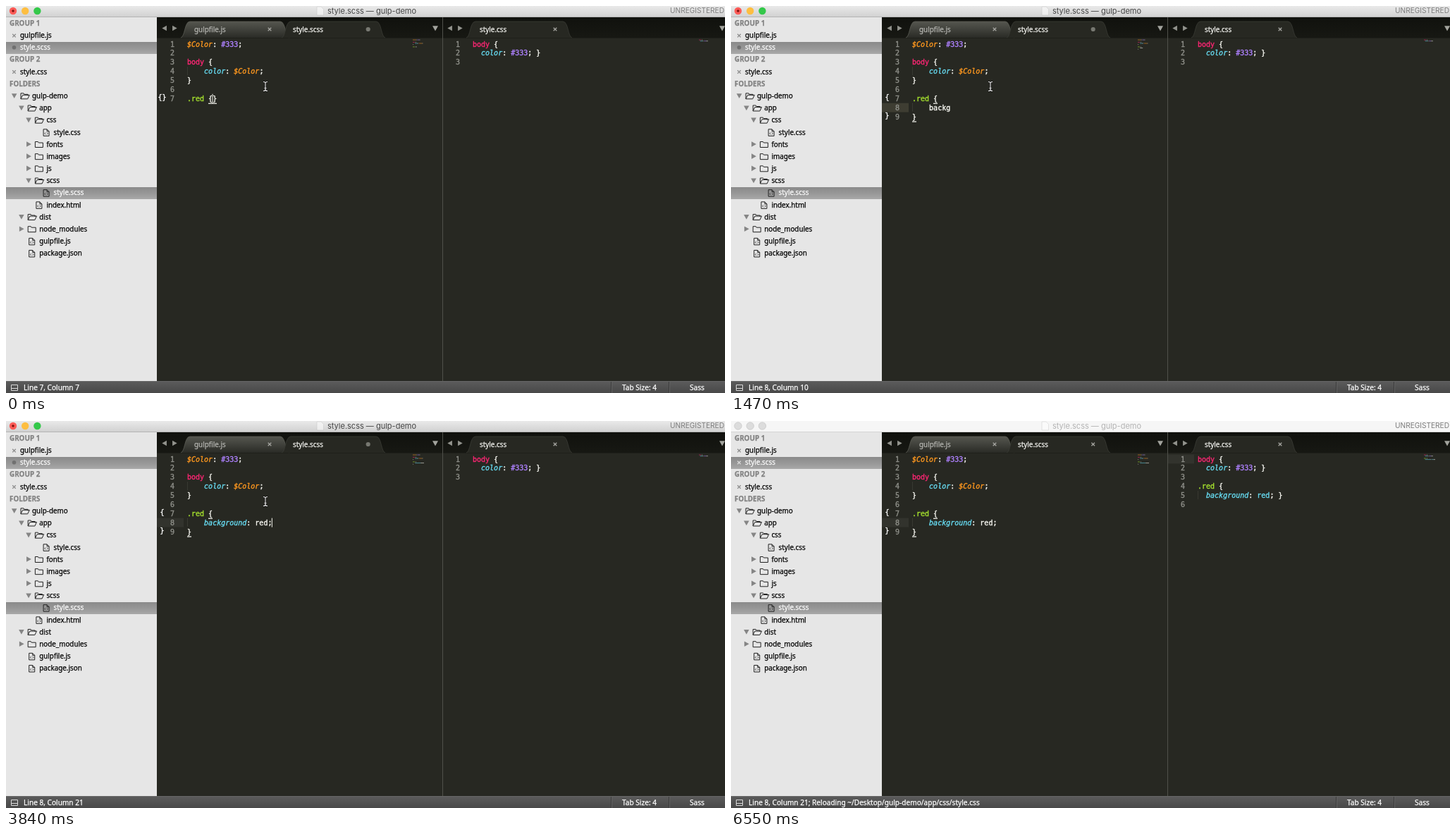
These frames come from a looping animation (1020 by 549 pixels, 6650 ms). An HTML page:

```html
<!DOCTYPE html>
<html lang="en">
<head>
<meta charset="utf-8">
<title>Sass editing demo</title>
<style>
html, body { margin: 0; width: 100%; height: 100%; overflow: hidden; background: #272822; }
svg { display: block; width: 1020px; height: 549px; }
text { white-space: pre; font: 9.85px "Noto Sans", "Open Sans", sans-serif; stroke-width: .25px; }
.mono { font: 10px "DejaVu Sans Mono", monospace; stroke-width: .38px; }
.list { stroke-width: .1px; }
.foot { font-size: 10.1px; }
.title { font: 11px Inter, Roboto, sans-serif; stroke-width: 0; }
.small { font-size: 10.15px; }
.i { font-style: italic; }
.b { font-weight: bold; }
.end { text-anchor: end; }
.mid { text-anchor: middle; }
</style>
</head>
<body>
<svg viewBox="0 0 1020 549">
  <defs>
    <linearGradient id="bar" x2="0" y2="1"><stop stop-color="#e9e9e9"/><stop offset="1" stop-color="#d2d2d2"/></linearGradient>
    <linearGradient id="row" x2="0" y2="1"><stop stop-color="#8a8a8a"/><stop offset=".5" stop-color="#979797"/><stop offset="1" stop-color="#a8a8a8"/></linearGradient>
    <linearGradient id="tabs" x2="0" y2="1"><stop stop-color="#10110d"/><stop offset="1" stop-color="#171813"/></linearGradient>
    <linearGradient id="back" x2="0" y2="1"><stop stop-color="#55564f"/><stop offset=".5" stop-color="#40413b"/><stop offset="1" stop-color="#2a2b26"/></linearGradient>
    <linearGradient id="foot" x2="0" y2="1"><stop stop-color="#5c5c5c"/><stop offset="1" stop-color="#484848"/></linearGradient>
    <linearGradient id="pick" x2="0" y2="1"><stop stop-color="#b4caec"/><stop offset="1" stop-color="#86a8d9"/></linearGradient>
    <filter id="shade" x="-10%" y="-10%" width="120%" height="130%"><feDropShadow dx="0" dy="2" stdDeviation="2" flood-opacity=".5"/></filter>
  </defs>
  <g id="base"></g>
  <g id="live"></g>
</svg>
<script>
const LOOP = 6650;
const CH = 6.02;
const PITCH = 12.88;
const INK = { w: '#f8f8f2', o: '#fd971f', p: '#ae81ff', r: '#f92672', c: '#66d9ef', k: '#66d9ef', g: '#a6e22e' };
const ITALIC = 'oc';

// Each entry changes part of the state from its time on.
const STEPS = [
  [0, { typed: null, caret: 1, dirty: true, split: false, built: false, active: true, note: '', mouse: [368, 114] }],
  [140, { typed: '' }],
  [290, { typed: 'b' }],
  [440, { typed: 'ba' }],
  [580, { typed: 'bac' }],
  [730, { typed: 'back' }],
  [880, { typed: 'backg' }],
  [1170, { split: true, caret: .7 }],
  [1320, { caret: .3 }],
  [1470, { caret: 0 }],
  [1770, { typed: 'backgr', caret: 1 }],
  [1920, { typed: 'backgro' }],
  [2060, { typed: 'backgrou' }],
  [2210, { typed: 'backgroun' }],
  [2510, { typed: 'background:' }],
  [2810, { typed: 'background: ' }],
  [2960, { typed: 'background: r' }],
  [3100, { typed: 'background: re' }],
  [3250, { typed: 'background: red' }],
  [3540, { typed: 'background: red;' }],
  [4130, { caret: .5 }],
  [4280, { caret: 0 }],
  [4430, { dirty: false, note: '; Saved ~/Desktop/gulp-demo/app/scss/style.scss (UTF-8)' }],
  [4870, { built: true, note: '; Reloading ~/Desktop/gulp-demo/app/css/style.css' }],
  [5020, { mouse: [355, 95] }],
  [5170, { mouse: [342, 75] }],
  [5320, { mouse: [430, 160] }],
  [5460, { mouse: [560, 272] }],
  [5610, { mouse: [685, 378] }],
  [5760, { mouse: [859, 478] }],
  [5910, { mouse: null }],
  [6200, { active: false }]
];

const SHORTCUTS = [
  ['b:a', 'bottom:auto'], ['bgz:a', 'background-size:auto'], ['bdlt:a', 'border-length:auto'],
  ['bga', 'background-attachment'], ['bga:s', 'background-attachment:scroll'], ['bga:f', 'background-attachment:fixed']
];
const VALUES = ['relative', 'repeat', 'red', 'repeat-x', 'repeat-y', 'col-resize', 'e-resize', 'n-resize'].map(v => [v]);

// Indent level, kind and label of the sidebar tree.
const TREE = [
  [0, 'open', 'gulp-demo'], [1, 'open', 'app'], [2, 'open', 'css'], [3, 'file', 'style.css'],
  [2, 'shut', 'fonts'], [2, 'shut', 'images'], [2, 'shut', 'js'], [2, 'open', 'scss'],
  [3, 'file', 'style.scss'], [2, 'file', 'index.html'], [1, 'open', 'dist'],
  [1, 'shut', 'node_modules'], [1, 'file', 'gulpfile.js'], [1, 'file', 'package.json']
];

const rect = (x, y, w, h, fill, more = '') => `<rect x="${x}" y="${y}" width="${w}" height="${h}" fill="${fill}" ${more}/>`;
const line = (d, color, more = '') => `<path d="${d}" fill="none" stroke="${color}" ${more}/>`;
const dot = (x, y, r, fill, more = '') => `<circle cx="${x}" cy="${y}" r="${r}" fill="${fill}" ${more}/>`;
const text = (x, y, s, fill, cls = '') => `<text x="${x}" y="${y}" fill="${fill}" stroke="${fill}" class="${cls}">${s}</text>`;
const mono = (x, y, s, fill, cls = '') => text(x, y, s, fill, 'mono ' + cls);
const cross = (x, y, color) => line(`M${x - 2.3} ${y - 2.3}l4.6 4.6m0 -4.6l-4.6 4.6`, color, 'stroke-width="1.3"');
const arrow = (x, y, turn, color, r = 3.8) =>
  `<path d="M${-r} ${-r * .8}H${r}L0 ${r}Z" fill="${color}" transform="translate(${x} ${y}) rotate(${turn})"/>`;
const rowY = i => 24.3 + 17.17 * i;
const lineY = n => 54 + PITCH * (n - 1);

function tab(l, r, fill, edge) {
  const top = `M${l} 45C${l + 6} 44 ${l + 5} 22 ${l + 13} 22H${r - 13}C${r - 5} 22 ${r - 6} 44 ${r} 45`;
  return `<path d="${top}Z" fill="${fill}"/>` + line(top, edge, 'stroke-width=".8"');
}

function folder(x, y, open) {
  const d = open
    ? `M${x + .5} ${y + 4}V${y - 4}h4l1 1.5h5v2M${x + .5} ${y + 4}l2.7 -5.5h9.6l-2.6 5.5Z`
    : `M${x + .5} ${y + 4}V${y - 4}h4l1 1.5h6v6.5Z`;
  return line(d, '#222', 'stroke-linejoin="round"');
}

function page(x, y) {
  return line(`M${x + .5} ${y - 4.5}h5l3 3v6.5h-8Z M${x + 5.5} ${y - 4.5}v3h3`, '#222') +
    line(`M${x + 3.6} ${y}l-1.4 1.5l1.4 1.5m1.8 -3l1.4 1.5l-1.4 1.5`, '#222', 'stroke-width=".8"');
}

function sidebar() {
  let s = rect(0, 15, 214, 517, '#e6e6e6') + rect(0, 51, 214, 17, 'url(#row)') + rect(0, 257, 214, 17, 'url(#row)');
  [[0, 'GROUP 1'], [3, 'GROUP 2'], [5, 'FOLDERS']].forEach(([i, name]) => {
    s += text(5, rowY(i) + 3.6, name, '#828282', 'b');
  });
  [[1, 'gulpfile.js', '#000'], [2, 'style.scss', '#fff'], [4, 'style.css', '#000']].forEach(([i, name, ink]) => {
    s += text(20, rowY(i) + 3.7, name, ink);
    if (i !== 2) s += cross(11.5, rowY(i) + .6, '#8c8c8c');
  });
  TREE.forEach(([level, kind, name], i) => {
    const y = rowY(i + 6), x = 37 + 10.2 * level;
    if (kind === 'file') s += page(x - 15, y + .5);
    else s += arrow(x - 25.3, y, kind === 'open' ? 0 : -90, '#858585') + folder(x - 16.5, y + .5, kind === 'open');
    s += text(x, y + 3.7, name, i === 8 ? '#fff' : '#000');
  });
  return s;
}

function frame() {
  let s = rect(214, 15, 806, 517, '#272822') + rect(214, 15, 806, 30.5, 'url(#tabs)');
  s += tab(248, 402, 'url(#back)', '#5b5c55') + tab(391, 538, '#272822', '#3c3d37') + tab(653, 803, '#272822', '#3c3d37');
  s += text(267, 36.5, 'gulpfile.js', '#b5b5b1') + text(407, 36.5, 'style.scss', '#f8f8f4') + text(672, 36.5, 'style.css', '#f8f8f4');
  s += cross(374, 33, '#a5a5a0') + cross(779, 33, '#a5a5a0');
  [225, 630].forEach(x => s += arrow(x, 31.5, 90, '#92938d', 3.7) + arrow(x + 14, 31.5, -90, '#92938d', 3.7));
  [609, 1016].forEach(x => s += arrow(x, 31.5, 0, '#a3a49e', 4));
  s += rect(619, 15, 1, 517, '#50514b');
  s += rect(0, 532, 1020, 17, 'url(#foot)') + rect(0, 532, 1020, 1, '#666');
  s += line('M7.5 537.5h9v8h-9Z M7.5 542.5h9', '#d8d8d8');
  [859, 941].forEach(x => s += rect(x - 1, 533, 1, 16, '#3b3b3b') + rect(x, 533, 1, 16, '#626262'));
  return s + text(874, 545, 'Tab Size: 4', '#fff', 'foot') + text(970, 545, 'Sass', '#fff', 'foot');
}

function titleBar({ active, dirty }) {
  let s = rect(0, 0, 1020, 15, active ? 'url(#bar)' : '#f6f6f6') + rect(0, 15, 1020, 1, active ? '#b4b4b4' : '#d5d5d5');
  ['#fc5b57', '#fdbe41', '#34c84a'].forEach((c, i) => {
    s += dot(10 + 17.2 * i, 7, 5.2, active ? c : '#dcdcdc', active ? '' : 'stroke="#cacaca" stroke-width=".8"');
  });
  if (active && dirty) s += dot(10, 7, 1.8, '#7d120f');
  s += `<path d="M441 1h6l3.5 3.5V13H441Z" fill="#fff" stroke="#bbb" stroke-width=".6" opacity="${active && !dirty ? 1 : .55}"/>`;
  s += text(519, 11, 'style.scss — gulp-demo', active ? '#444' : '#b3b3b3', 'title mid');
  return s + text(1019, 10.3, 'UNREGISTERED', '#7d7d7d', 'title small end');
}

// Lines hold tokens split by "|"; the first letter of a token is its colour.
function code(lines, x, mapX) {
  let s = '';
  lines.forEach((src, i) => {
    const y = lineY(i + 1);
    let col = 0, spans = '';
    s += mono(x - 18, y + 3.6, i + 1, '#8f908a', 'end');
    src.split('|').filter(Boolean).forEach(token => {
      const key = token[0], body = token.slice(1), c = INK[key];
      spans += `<tspan fill="${c}" stroke="${c}" class="${ITALIC.includes(key) ? 'i' : ''}">${body}</tspan>`;
      const pad = body.length - body.trimStart().length, n = body.trim().length;
      if (n) s += rect(mapX + .8 * (col + pad), 47.6 + 1.65 * i, .8 * n, .9, c, 'opacity=".6"');
      col += body.length;
    });
    s += mono(x, y + 3.6, spans, INK.w);
  });
  return s;
}

function popup(x, rows, query, bar) {
  const h = rows.length * 13.75 + 1;
  let s = rect(x, 152, 259, h, '#fff', 'stroke="#777" stroke-width=".8" filter="url(#shade)"') +
    rect(x + .5, 152.5, 258, 13, 'url(#pick)');
  rows.forEach(([name, hint], i) => {
    let at = 0;
    const y = 162.5 + 13.72 * i;
    const label = [...name].map(ch => ch === query[at] ? (at++, `<tspan class="b" fill="#000">${ch}</tspan>`) : ch).join('');
    s += mono(x + 4, y, label, '#333', 'list');
    if (hint) s += mono(x + 255, y, hint, '#333', 'list i end');
  });
  return bar ? s + rect(x + 250, 154, 6, 50, '#777', 'rx="3"') : s;
}

function editor({ typed, caret, split, built }) {
  const open = typed !== null;
  const rule = (typed || '').match(/^(background)(:.*)$/);
  const body = rule ? `c${rule[1]}|w${rule[2]}` : 'w' + typed;
  const left = ['o$Color|w: |p#333|w;', '', 'rbody|w {', 'w    |ccolor|w: |o$Color|w;', 'w}', '']
    .concat(open ? ['g.red|w {', 'w    |' + body, 'w}'] : ['g.red|w {}']);
  const right = ['rbody|w {', 'w  |ccolor|w: |p#333|w; }', ''].concat(built ? ['g.red|w {', 'w  |cbackground|w: |kred|w; }', ''] : []);
  let s = '';
  if (open) s += rect(214, 137.7, 38, 12.9, typed === 'backg' && split ? '#3e3d32' : '#32332d');
  if (built) s += rect(620, 47.5, 37, 12.9, '#32332d');
  const guide = (x, n) => line(`M${x} ${lineY(n) - 6}v12`, '#4a4b44', 'stroke-dasharray="1 1"');
  s += guide(257.5, 4) + (open ? guide(257.5, 8) : '') + (built ? guide(662.5, 5) : '');
  s += code(left, 257, 577) + code(right, 662, 983);

  const mark = (n, sign) => mono(221.5, lineY(n) + 2.2, sign, '#fff', 'mid');
  s += mark(7, split ? '{' : '{}');
  if (open) s += mark(9, split ? '}' : '{}') + rect(257, 163.5, 6, 1.2, '#f8f8f2');
  s += rect(287, 137.7, open ? 6 : 12, 1.2, '#f8f8f2');
  const caretX = open ? 281 + typed.length * CH : 293;
  s += rect(caretX - .5, lineY(open ? 8 : 7) - 6.5, 1, 13, '#f8f8f0', `opacity="${caret}"`);

  const value = open && typed.match(/^background: (re?)$/);
  if (value) s += popup(349, VALUES, value[1], true);
  else if (typed === 'b' || typed === 'ba') s += popup(277, SHORTCUTS, typed);
  return s;
}

function marks({ dirty }) {
  return dirty
    ? dot(11.5, 58.8, 2.8, '#707070') + dot(513.7, 33, 3.1, '#777871')
    : cross(11.5, 59, '#d9d9d9') + cross(513.7, 33, '#a5a5a0');
}

function status({ typed, note }) {
  const place = typed === null ? 'Line 7, Column 7' : `Line 8, Column ${typed.length + 5}`;
  return text(25, 545, place + note, '#fff', 'foot');
}

function pointer([x, y]) {
  const d = 'M-3 -6.5Q0 -6.5 0 -4.5V4.5Q0 6.5 -3 6.5M3 -6.5Q0 -6.5 0 -4.5M0 4.5Q0 6.5 3 6.5M-1.5 2.5H1.5';
  return `<g transform="translate(${x} ${y})">${line(d, '#111', 'stroke-width="2.4"')}${line(d, '#eee', 'stroke-width="1.1"')}</g>`;
}

const live = document.getElementById('live');
document.getElementById('base').innerHTML = sidebar() + frame();
let shown = -1;

function tick() {
  const t = performance.now() % LOOP;
  const at = STEPS.filter(([start]) => start <= t).length;
  if (at !== shown) {
    shown = at;
    const state = Object.assign({}, ...STEPS.slice(0, at).map(step => step[1]));
    live.innerHTML = titleBar(state) + marks(state) + editor(state) + status(state) + (state.mouse ? pointer(state.mouse) : '');
  }
  requestAnimationFrame(tick);
}
tick();
</script>
</body>
</html>
```
